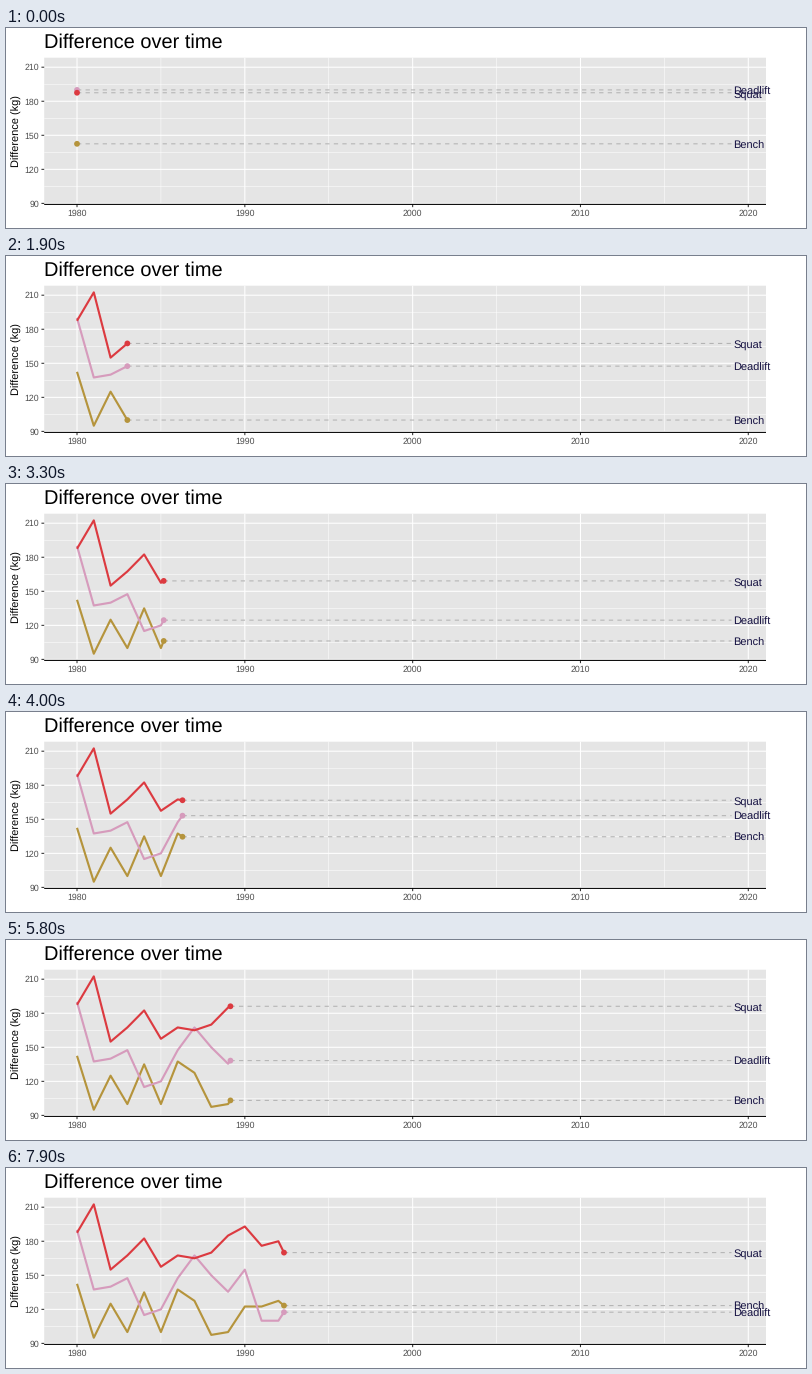
Write a matplotlib script that moves like this. It is 800 by 200 pixels and loops after 8 s.

```python
import numpy as np
import matplotlib.pyplot as plt
from matplotlib.animation import FuncAnimation
from matplotlib.patches import Circle, Rectangle

plt.rcParams.update({
    "font.family": "Liberation Sans",
    "text.hinting": "none",
    "path.snap": False,
})

W, H, DPI = 800, 200, 100
PT = 72 / DPI                       # points per pixel
FRAMES, INTERVAL = 80, 100
LEFT, RIGHT, TOP, BOTTOM = 38.2, 760, 29.7, 176.4
FIRST, LAST, STEPS = 1980, 2019, 249
LABEL_AT = LAST + 0.1

# One key point (kg) per year; the lines run straight between them
SERIES = {
    "Bench": ("#b5943c", [142.5, 95, 125, 100, 135, 100, 137.5,
                          127.5, 97.5, 100, 122.5, 122.5, 127.5, 115]),
    "Deadlift": ("#d69bbc", [190, 137.5, 140, 147.5, 115, 120, 147.5,
                             167.5, 150, 135.5, 155, 110, 110, 132.5]),
    "Squat": ("#dc3a40", [187.5, 212.5, 155, 167.5, 182.5, 157.5, 167.5,
                          165, 170, 185, 193, 176, 180, 150]),
}
ALL_KG = np.array([kg for _, kg in SERIES.values()])
YEARS = FIRST + np.arange(ALL_KG.shape[1])
# Each year lands on a whole step of the reveal
KEYS = np.round((YEARS - FIRST) * STEPS / (LAST - FIRST))


def scale(low, high, start, end):
    """Map low..high into start..end with 5 % room on both sides."""
    room = 0.05 * (high - low)
    k = (end - start) / (high - low + 2 * room)
    return lambda v: start + (np.asarray(v) - low + room) * k


px = scale(FIRST, LABEL_AT, LEFT, RIGHT)
py = scale(ALL_KG.min(), ALL_KG.max(), BOTTOM, TOP)

fig = plt.figure(figsize=(W / DPI, H / DPI), dpi=DPI, facecolor="white")
ax = fig.add_axes([0, 0, 1, 1])
ax.set(xlim=(0, W), ylim=(H, 0))
ax.axis("off")


def line(xs, ys, color, width, z=1, **kw):
    return ax.plot(xs, ys, color=color, lw=width * PT, zorder=z, snap=False,
                   solid_capstyle="butt", solid_joinstyle="round", **kw)[0]


def text(x, y, s, size, color="black", **kw):
    kw = {"va": "baseline", **kw}
    return ax.text(x, y, s, fontsize=size * PT, color=color, zorder=6, **kw)


def draw_panel():
    ax.add_patch(Rectangle((LEFT, TOP), RIGHT - LEFT, BOTTOM - TOP,
                           fc="#e5e5e5", lw=0, zorder=0, snap=False))
    for y in py(range(105, 210, 30)):
        line([LEFT, RIGHT], [y, y], "white", 0.53)
    for x in px(range(1985, 2020, 10)):
        line([x, x], [TOP, BOTTOM], "white", 0.53)
    for kg in range(90, 211, 30):
        y = py(kg)
        line([LEFT, RIGHT], [y, y], "white", 1.07)
        line([LEFT - 2.75, LEFT], [y, y], "#333333", 1.07)
        text(33.2, y + 3.2, kg, 8.8, "#4d4d4d", ha="right")
    for year in range(1980, 2021, 10):
        x = px(year)
        line([x, x], [TOP, BOTTOM], "white", 1.07)
        line([x, x], [BOTTOM, BOTTOM + 2.75], "#333333", 1.07)
        text(x, 188, year, 8.8, "#4d4d4d", ha="center")
    line([LEFT, RIGHT], [BOTTOM, BOTTOM], "black", 1.07, 2)
    text(LEFT, 20, "Difference over time", 20)
    text(13.5, (TOP + BOTTOM) / 2, "Difference (kg)", 11, rotation=90,
         ha="center", rotation_mode="anchor")


class Track:
    """One line with its moving dot, dashed guide and label."""

    def __init__(self, name, color, kg):
        self.kg = np.array(kg)
        self.trail = line([], [], color, 2.13, 3)
        self.guide = line([], [], "#b4b4b4", 1.07, 4, dashes=(4, 4),
                          dash_capstyle="butt")
        self.dot = ax.add_patch(Circle((0, 0), 2.9, fc=color, lw=0, zorder=5,
                                       snap=False))
        self.label = text(px(LABEL_AT), 0, name, 11.04, "#130f40")

    def move(self, now):
        x, y = px(now), py(np.interp(now, YEARS, self.kg))
        past = YEARS < now
        self.trail.set_data(np.append(px(YEARS[past]), x),
                            np.append(py(self.kg[past]), y))
        self.guide.set_data([x, px(LAST)], [y, y])
        self.dot.center = x, y
        self.label.set_y(y + 4.6)


draw_panel()
tracks = [Track(name, *spec) for name, spec in SERIES.items()]


def update(i):
    now = np.interp(i, KEYS, YEARS)
    for track in tracks:
        track.move(now)
    return []


anim = FuncAnimation(fig, update, frames=FRAMES, interval=INTERVAL,
                     repeat=True, repeat_delay=0, blit=False)
plt.show()
```
